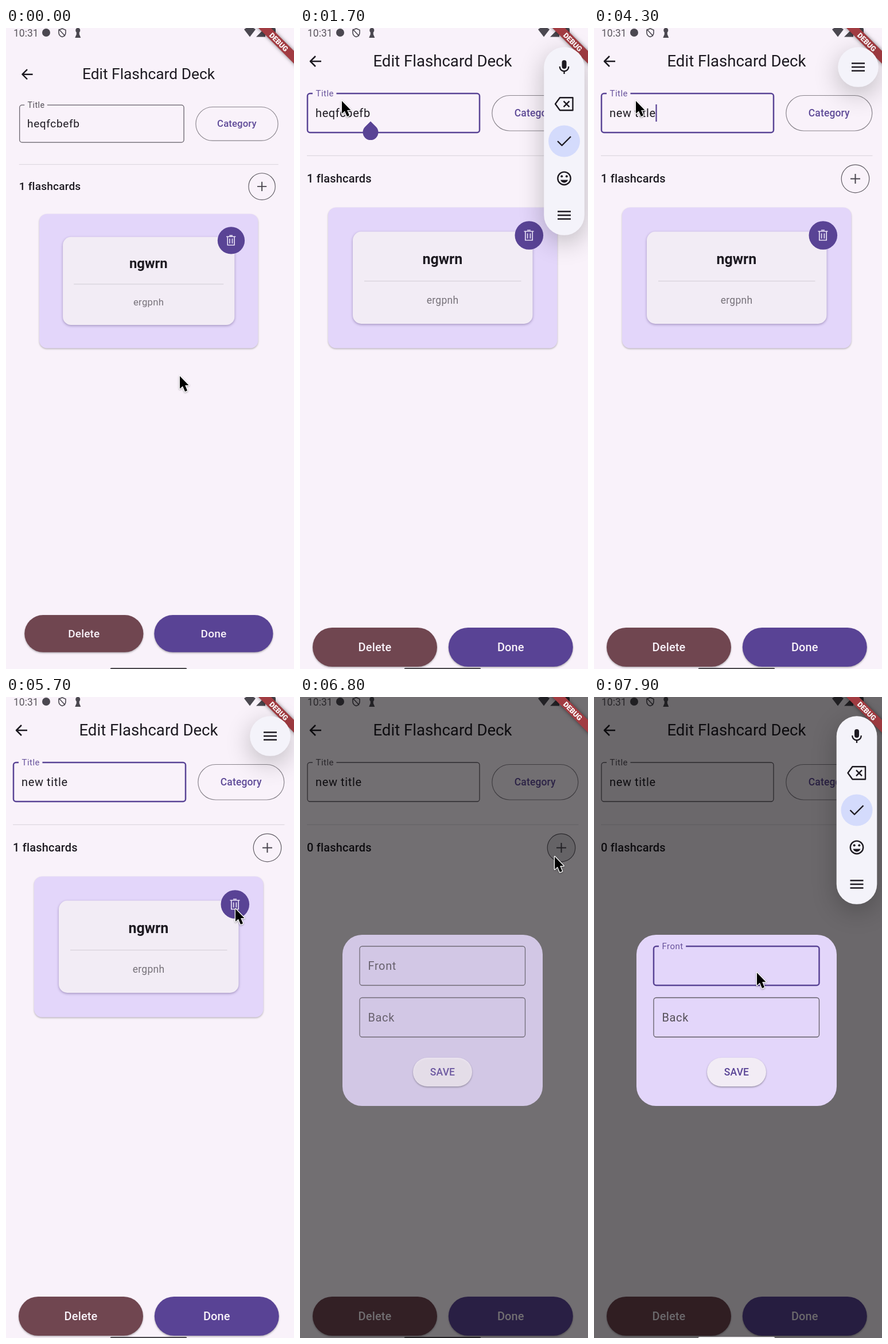
Write an HTML page with a canvas that moves like this. It is 502 by 1116 pixels and loops after 8 s.

```html
<!DOCTYPE html>
<html lang="en">
<head>
<meta charset="utf-8">
<title>Edit Flashcard Deck</title>
<style>
html, body { margin: 0; width: 100%; height: 100%; overflow: hidden; background: #f9f2fa; }
canvas { display: block; width: 100%; height: 100%; }
</style>
</head>
<body>
<canvas id="stage"></canvas>
<script>
const W = 502, H = 1116, LOOP = 8000;
const canvas = document.getElementById('stage');
const ctx = canvas.getContext('2d');
const dpr = window.devicePixelRatio || 1;
canvas.width = W * dpr;
canvas.height = H * dpr;

const BG = '#f9f2fa', PURPLE = '#594395', CARD = '#e3d6fa', PALE = '#f2ecf5';
const INK = '#1d1a21', GREY = '#4b4850', EDGE = '#625d66';
const OLD = 'heqfcbefb', NEW = 'new title';

// Times of the events, in ms
const T = { focus: 1050, panel: 1300, select: 1880, type: 2900, key: 120,
            remove: 5850, add: 6600, front: 7375, panel2: 7520 };
const TYPED = T.type + T.key * (NEW.length - 1);

// Pointer stops: time, x, y
const PATH = [[300, 303, 606], [1000, 199, 124], [1250, 199, 124], [1700, 73, 127],
  [4600, 73, 127], [5500, 400, 369], [6020, 400, 369], [6480, 444, 278],
  [6900, 444, 278], [7300, 284, 480]];

const clamp = v => Math.max(0, Math.min(1, v));
const span = (t, a, b) => clamp((t - a) / (b - a));
const smooth = v => v * v * (3 - 2 * v);
const easeOut = v => 1 - Math.pow(1 - v, 3);
const mix = (a, b, k) => a + (b - a) * k;
const blink = (t, from) => Math.floor((t - from) / 500) % 2 === 0;

function text(s, x, y, size, color, o = {}) {
  ctx.font = `${o.weight || 400} ${size}px Roboto, sans-serif`;
  ctx.letterSpacing = (o.gap || 0) + 'px';
  ctx.textAlign = o.align || 'left';
  ctx.fillStyle = color;
  ctx.fillText(s, x, y);
}

function box(x, y, w, h, r, fill, shadow) {
  ctx.save();
  if (shadow) {
    ctx.shadowColor = shadow[0];
    ctx.shadowBlur = shadow[1] * dpr;
    ctx.shadowOffsetY = shadow[2] * dpr;
  }
  ctx.beginPath();
  ctx.roundRect(x, y, w, h, r);
  ctx.fillStyle = fill;
  ctx.fill();
  ctx.restore();
}

function outline(x, y, w, h, r, color, width) {
  ctx.beginPath();
  ctx.roundRect(x, y, w, h, r);
  ctx.strokeStyle = color;
  ctx.lineWidth = width;
  ctx.stroke();
}

function disc(x, y, r, fill) {
  ctx.beginPath();
  ctx.arc(x, y, r, 0, Math.PI * 2);
  ctx.fillStyle = fill;
  ctx.fill();
}

function shape(d, x, y, color, width) {
  ctx.save();
  ctx.translate(x, y);
  ctx.lineJoin = 'round';
  const p = new Path2D(d);
  if (width) {
    ctx.lineWidth = width;
    ctx.strokeStyle = color;
    ctx.stroke(p);
  } else {
    ctx.fillStyle = color;
    ctx.fill(p);
  }
  ctx.restore();
}

function faded(alpha, draw) {
  if (alpha <= 0) return;
  ctx.save();
  ctx.globalAlpha *= alpha;
  draw();
  ctx.restore();
}

function field(x, y, w, h, focused, label, lift, back) {
  const color = focused ? PURPLE : EDGE;
  outline(x, y, w, h, 4.5, color, focused ? 2.5 : 1.3);
  if (lift > 0) {
    ctx.font = '400 15px Roboto, sans-serif';
    ctx.letterSpacing = '0.47px';
    const gap = ctx.measureText(label).width + 10;
    ctx.fillStyle = back;
    ctx.fillRect(x + 9, y - 2, gap * lift, 4);
  }
  text(label, x + 14.5, y + mix(41, 5, lift), mix(20, 15, lift),
    focused ? '#69549d' : '#555059', { gap: mix(0.62, 0.47, lift) });
}

function pill(x, label, fill) {
  box(x, 1044, 217, 68, 34, fill, ['rgba(0,0,0,.3)', 3, 1.5]);
  text(label, x + 108.5, 1085, 20, '#f7f1f8', { weight: 500, align: 'center', gap: 0.12 });
}

function handle(x, y, side) {
  const r = 13.5;
  ctx.save();
  ctx.translate(x, y);
  if (!side) ctx.rotate(Math.PI / 4);
  box(side < 0 ? -2 * r : 0, 0, 2 * r, 2 * r,
    side < 0 ? [r, 0, r, r] : [0, r, r, r], PURPLE);
  ctx.restore();
}

function titleField(t) {
  const focused = t >= T.focus && t < T.add;
  const selected = t >= T.select && t < T.type;
  const count = Math.floor((t - T.type) / T.key) + 1;
  const value = t < T.type ? OLD : NEW.slice(0, count);
  field(13, 114, 300, 68, focused, 'Title', 1, BG);
  if (selected) {
    ctx.fillStyle = '#b9aad3';
    ctx.fillRect(27, 136, 95.5, 24);
  }
  text(value, 27, 154.5, 20, INK, { gap: 0.62 });
  const end = 27 + ctx.measureText(value).width;
  const lit = t < T.type ? blink(t, T.focus) : t < TYPED || blink(t, TYPED);
  if (focused && !selected && lit) {
    ctx.fillStyle = PURPLE;
    ctx.fillRect(end - 0.2, 133, 2.2, 30);
  }
  if (focused && t < T.select) {
    faded(mix(0.6, 1, span(t, T.focus, 1160)), () => handle(123, 162.5, 0));
  }
  if (selected) {
    handle(26.5, 160, -1);
    handle(123, 160, 1);
  }
}

function trash(x, y) {
  shape('M-6.2-6.5V8.5H6.2V-6.5M-8.5-7H8.5M-3-9H3M-2.4-3.5V5.5M2.4-3.5V5.5', x, y, '#e9e1f6', 1.7);
}

function deck() {
  box(49, 312.5, 399.5, 245, 14, CARD, ['rgba(0,0,0,.25)', 3, 1.5]);
  box(92, 354.5, 313.5, 160.5, 15, PALE, ['rgba(40,20,80,.35)', 4, 1.5]);
  text('ngwrn', 248.3, 411, 25, INK, { weight: 700, align: 'center' });
  ctx.fillStyle = '#d6d1d9';
  ctx.fillRect(112, 440, 273.5, 1.2);
  text('ergpnh', 248.6, 479.5, 17.5, '#77727a', { align: 'center', gap: 0.3 });
  disc(399.3, 361, 24.8, PURPLE);
  trash(399, 361);
}

function page(t) {
  const k = mix(0.954, 1, easeOut(span(t, 0, 220)));
  ctx.save();
  ctx.translate(248.5, 558);
  ctx.scale(k, k);
  ctx.translate(-248.5, -558);
  shape('M10 0H-8.5M0-9L-9 0L0 9', 27, 58, INK, 2.5);
  text('Edit Flashcard Deck', 248.5, 67, 27.6, INK, { align: 'center' });
  titleField(t);
  outline(334.8, 117.5, 150, 61.5, 30.7, '#8a858d', 1.2);
  text('Category', 409.7, 154, 17.5, '#5f4b98', { weight: 500, align: 'center', gap: 0.125 });
  ctx.fillStyle = '#ddd7df';
  ctx.fillRect(12, 221.7, 473.5, 1.2);
  text((t < T.remove ? 1 : 0) + ' flashcards', 12, 268.5, 20, INK, { weight: 500, gap: 0.18 });
  const splash = span(t, T.add, T.add + 120) * (1 - span(t, 6850, 7100));
  faded(splash * 0.11, () => disc(455.5, 262.5, 24.5, '#000'));
  outline(431.2, 238.2, 48.6, 48.6, 24.3, '#5f5b63', 1.2);
  shape('M-8.5 0H8.5M0-8.5V8.5', 455.5, 262.5, '#49454e', 2);
  if (t < T.remove) deck();
  pill(22, 'Delete', '#704650');
  pill(258.8, 'Done', PURPLE);
  ctx.restore();
}

function statusBar() {
  text('10:31', 13, 14.5, 17.5, '#5b575e');
  disc(70, 8, 7, GREY);
  shape('M0-7L6-4.5V0C6 4 3 6.5 0 7.5C-3 6.5-6 4-6 0V-4.5ZM-6-6L5 6', 98, 8, GREY, 1.6);
  disc(125.3, 4, 4, GREY);
  shape('M-2.5-2H2.5V3L5 9H-5L-2.5 3Z', 125.3, 8, GREY);
  shape('M-10-5Q0-13 10-5L0 8Z', 425, 7.5, GREY);
  shape('M8-8V8H-8Z', 444, 7.5, GREY);
  box(460, 0, 10, 15, 2, GREY);
}

function banner() {
  ctx.save();
  ctx.translate(475.5, 24.5);
  ctx.rotate(Math.PI / 4);
  box(-70, -7.8, 140, 15.6, 0, '#a23c42', ['rgba(0,0,0,.5)', 6, 0]);
  text('DEBUG', 0, 4.5, 12.6, '#fff', { weight: 900, align: 'center' });
  ctx.restore();
}

function toolbar() {
  box(2, 71.5, 308, 55, 27.5, '#fdfbfe', ['rgba(0,0,0,.35)', 5, 1.5]);
  [['Cut', 33.3], ['Copy', 93.2], ['Share', 158.5], ['Read aloud', 248.3]].forEach(([s, x]) =>
    text(s, x, 105, 17.5, '#151318', { align: 'center' }));
}

function menuIcon(x, y) {
  shape('M-11.5-6.5H11.5M-11.5 0H11.5M-11.5 6.5H11.5', x, y, INK, 2.4);
}

// Floating keyboard strip; open runs from 0 (round button) to 1 (full strip)
function panel(x, open) {
  const drop = 258 * open;
  box(x - 35.3, 33.3, 70.6, 69.5 + drop, 35, '#f4f3fa', ['rgba(0,0,0,.24)', 44, 12]);
  faded(span(open, 0.6, 1), () => {
    box(x - 4, 56, 8, 15, 4, INK);
    shape('M-7.8-1C-7.8 10 7.8 10 7.8-1M0 7.5V12', x, 68, INK, 2.3);
    shape('M-7.5-11H15V11H-7.5L-15.5 0ZM-1-5L9 5M9-5L-1 5', x, 132.3, INK, 2.4);
    disc(x, 197, 27.5, '#d4dbfc');
    shape('M-11.5 0L-4 7.5L11.5-8', x, 197, INK, 2.4);
    outline(x - 11.2, 250.6, 22.4, 22.4, 11.2, INK, 2.4);
    disc(x - 4.3, 258.2, 2, INK);
    disc(x + 4.3, 258.2, 2, INK);
    shape('M-6.5 2.5C-4 9 4 9 6.5 2.5Z', x, 262, INK);
  });
  menuIcon(x, 68 + drop);
}

function panels(t) {
  if (t >= T.panel && t < T.add) {
    const slide = easeOut(span(t, T.panel, T.panel + 220));
    panel(mix(545, 460.5, slide), 1 - smooth(span(t, T.type, T.type + 180)));
  } else if (t >= T.panel2) {
    panel(mix(545, 458, easeOut(span(t, T.panel2, T.panel2 + 230))), 1);
  }
}

function dialog(t) {
  const focused = t >= T.front;
  box(74, 414, 349, 298, 34, CARD);
  field(104, 434, 288.5, 68, focused, 'Front', smooth(span(t, T.front, T.front + 170)), CARD);
  if (focused && t > T.front + 60 && blink(t, T.front)) {
    ctx.fillStyle = PURPLE;
    ctx.fillRect(118.5, 453, 2.2, 30);
  }
  field(104, 523.5, 288.5, 68.5, false, 'Back', 0, CARD);
  box(197, 628, 103, 50, 25, PALE, ['rgba(0,0,0,.35)', 3, 1.5]);
  text('SAVE', 248.5, 659, 17.5, PURPLE, { weight: 500, align: 'center', gap: 0.125 });
}

function pointer(t) {
  let [, x, y] = PATH[0];
  for (let i = 1; i < PATH.length; i++) {
    const [a, x0, y0] = PATH[i - 1], [b, x1, y1] = PATH[i];
    if (t >= a) {
      const k = smooth(span(t, a, b));
      x = mix(x0, x1, k);
      y = mix(y0, y1, k);
    }
  }
  const arrow = 'M0 0V22L5 17.4L9 27L13 25.2L9.2 16H15.5Z';
  ctx.save();
  ctx.shadowColor = 'rgba(0,0,0,.35)';
  ctx.shadowBlur = 3 * dpr;
  ctx.shadowOffsetY = dpr;
  shape(arrow, x, y, '#fff', 2.6);
  ctx.restore();
  shape(arrow, x, y, '#000');
}

function draw(t) {
  ctx.setTransform(canvas.width / W, 0, 0, canvas.height / H, 0, 0);
  ctx.fillStyle = BG;
  ctx.fillRect(0, 0, W, H);
  page(t);
  statusBar();
  box(181.5, 1114, 134, 5, 2.5, '#4a474c');
  if (t >= T.add) {
    const dim = 0.54 * easeOut(span(t, T.add, T.add + 190)) + 0.03 * span(t, T.panel2, T.panel2 + 200);
    faded(dim, () => {
      ctx.fillStyle = '#000';
      ctx.fillRect(0, 0, W, H);
    });
    // Fade the dialog as one layer over the dimmed page
    const fade = span(t, T.add + 30, T.add + 230);
    faded(fade, () => dialog(t));
  }
  if (t >= T.panel2) box(181.5, 1114, 134, 5, 2.5, '#f1eff2');
  if (t >= T.select && t < T.type + 150) {
    faded(span(t, T.select, T.select + 150) * (1 - span(t, T.type, T.type + 150)), toolbar);
  }
  banner();
  panels(t);
  pointer(t);
}

const start = performance.now();
function tick() {
  draw((performance.now() - start) % LOOP);
  requestAnimationFrame(tick);
}
tick();
</script>
</body>
</html>
```
